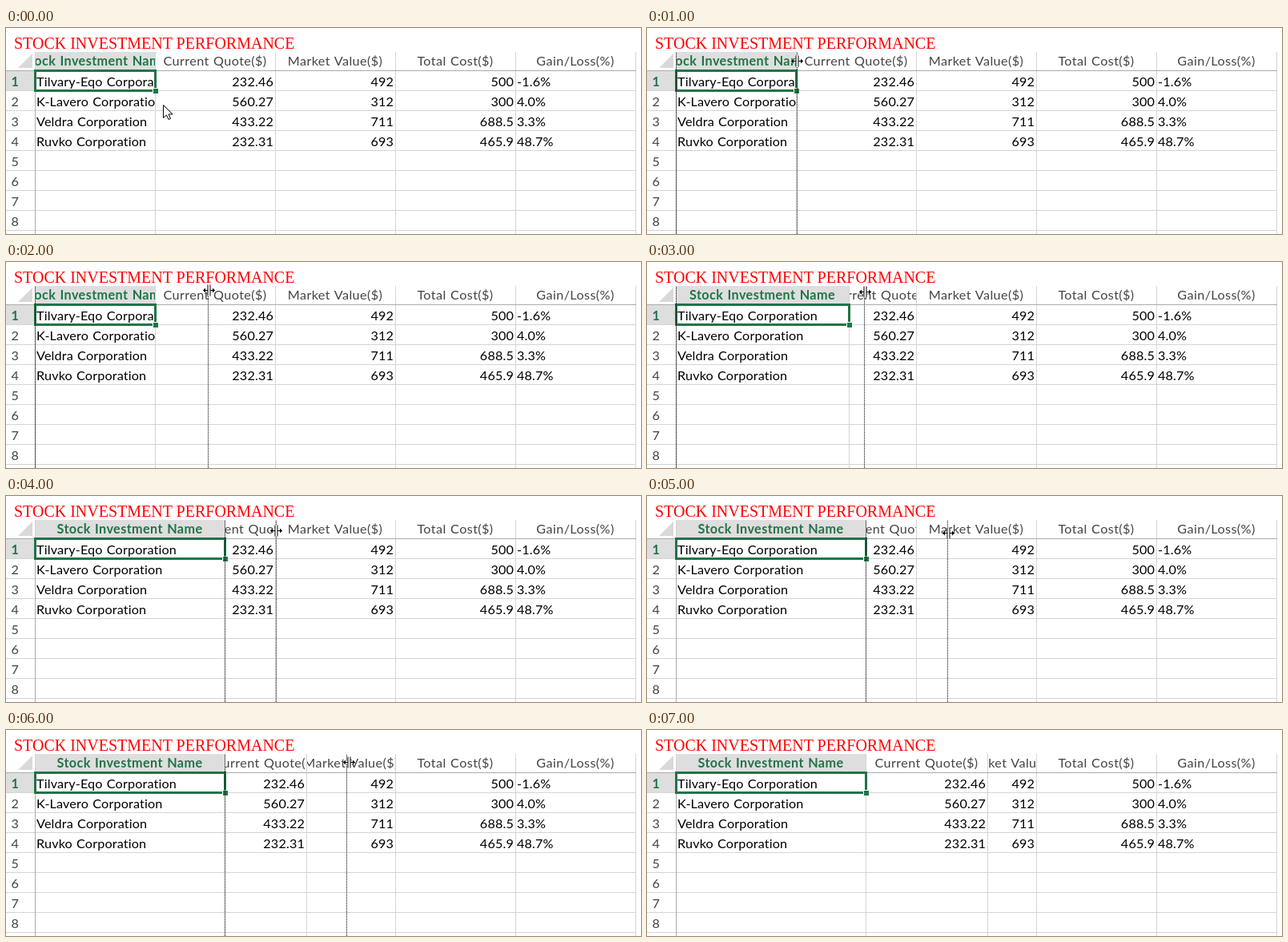
Recreate the animation shown at these times as an HTML page. Size 793 by 258 pixels, loop 8000 ms.

```html
<!DOCTYPE html>
<html lang="en">
<head>
<meta charset="utf-8">
<title>Stock investment performance</title>
<style>
html, body { margin: 0; width: 100%; height: 100%; overflow: hidden; background: #fff; }
svg { display: block; }
text { font: 16.2px Lato, Carlito, sans-serif; letter-spacing: .15px; word-spacing: .9px; white-space: pre; }
.title { font: 20px "Liberation Serif", "Times New Roman", serif; letter-spacing: 0; word-spacing: 0; fill: #f00; }
.head { fill: #444; letter-spacing: .4px; }
.picked { fill: #217346; font-weight: 700; letter-spacing: .4px; }
</style>
</head>
<body>
<svg id="stage" width="793" height="258" viewBox="0 0 793 258"></svg>
<script>
const stage = document.getElementById('stage');
const GREEN = '#217346', GRID = '#d4d4d4', EDGE = '#ababab', SHADE = '#dedede';
const LEFT = 36, TOP = 53, ROW = 25, LOOP = 8000;

const heads = ['Stock Investment Name', 'Current Quote($)', 'Market Value($)', 'Total Cost($)', 'Gain/Loss(%)'];
const rows = [
  ['Tilvary-Eqo Corporation', '232.46', '492', '500', '-1.6%'],
  ['K-Lavero Corporation', '560.27', '312', '300', '4.0%'],
  ['Veldra Corporation', '433.22', '711', '688.5', '3.3%'],
  ['Ruvko Corporation', '232.31', '693', '465.9', '48.7%']
];

// a, b: right edges of the first two columns; drag: guide lines; grip, arrow: pointer position
const steps = [
  { at: 0, a: 186, b: 336, arrow: [196, 96] },
  { at: 1000, a: 186, b: 336, drag: [36, 187], grip: [187, 41] },
  { at: 2000, a: 186, b: 336, drag: [36, 252], grip: [253, 35] },
  { at: 3000, a: 252, b: 336, drag: [36, 271], grip: [272, 37] },
  { at: 4000, a: 273, b: 336, drag: [273, 337], grip: [337, 43] },
  { at: 5000, a: 273, b: 336, drag: [273, 375], grip: [376, 46] },
  { at: 6000, a: 273, b: 375, drag: [273, 425], grip: [428, 40] },
  { at: 7000, a: 273, b: 425 }
];

const rect = (x, y, w, h, fill) =>
  `<rect x="${x}" y="${y}" width="${w}" height="${h}" fill="${fill}"/>`;

const label = (x, y, s, cls = '', anchor = 'start') =>
  `<text x="${x}" y="${y}" class="${cls}" text-anchor="${anchor}">${s}</text>`;

const clip = (x, y, w, h, inner) =>
  `<svg x="${x}" y="${y}" width="${w}" height="${h}" viewBox="${x} ${y} ${w} ${h}">${inner}</svg>`;

const guide = x =>
  `<path d="M${x + .5} 31V258" stroke="#000" stroke-dasharray="1 1" shape-rendering="crispEdges"/>`;

const grip = ([x, y]) => `<g transform="translate(${x + .5} ${y + .5})" fill="none">
  <path d="M0 -7V7M-7 0H7" stroke="#fff" stroke-width="4"/>
  <path d="M-1.5 -7V7M1.5 -7V7M-7 0H-1.5M1.5 0H7" stroke="#000"/>
  <path d="M-7.5 0l3 -3v6zM7.5 0l-3 -3v6z" fill="#000"/></g>`;

const arrow = ([x, y]) =>
  `<path transform="translate(${x + .5} ${y + .5})" d="M0 0V16L4 12.5L6.5 18L9 17L6.5 11.5H11.5Z" fill="#fff" stroke="#000"/>`;

function sheet({ a, b }) {
  const edges = [LEFT, a, b, 486, 636, 786];
  let out = rect(LEFT + 1, 30, a - LEFT - 1, 23, SHADE) + rect(0, TOP + 1, 35, 24, SHADE);
  out += '<path d="M33 32V50H15Z" fill="#d9d9d9"/>';

  for (const x of edges) out += rect(x, 30, 1, 228, GRID);
  for (let i = 1; i <= 8; i++) out += rect(0, TOP + i * ROW, 787, 1, GRID);
  out += rect(0, TOP, 787, 1, EDGE) + rect(LEFT, TOP, 1, 205, EDGE);

  for (let i = 0; i < 8; i++)
    out += label(11.5, 73 + i * ROW, i + 1, i ? 'head' : 'picked', 'middle');

  heads.forEach((head, c) => {
    const x = edges[c], w = edges[c + 1] - x;
    out += clip(x + 1, 30, w - 1, 23, label(x + w / 2, 47, head, c ? 'head' : 'picked', 'middle'));
    const right = c > 0 && c < 4;
    const cells = rows.map((row, r) =>
      label(right ? x + w - 2 : x + 2, 73 + r * ROW, row[c], '', right ? 'end' : 'start')).join('');
    out += clip(x + 1, TOP + 1, w, 204, cells);
  });

  out += `<rect x="36.5" y="53.5" width="${a - LEFT}" height="25" fill="none" stroke="${GREEN}" stroke-width="3"/>`;
  return out + rect(a - 3, 75, 7, 7, '#fff') + rect(a - 2, 76, 6, 6, GREEN);
}

function draw(step) {
  stage.innerHTML = rect(0, 0, 793, 258, '#fff') + sheet(step) +
    label(10, 26, 'STOCK INVESTMENT PERFORMANCE', 'title') +
    (step.drag || []).map(guide).join('') +
    (step.grip ? grip(step.grip) : '') +
    (step.arrow ? arrow(step.arrow) : '');
}

let shown;
const start = performance.now();
function tick(now) {
  const t = Math.max(0, now - start) % LOOP;
  const step = steps.findLast(s => s.at <= t);
  if (step !== shown) draw(shown = step);
  requestAnimationFrame(tick);
}
tick(start);
</script>
</body>
</html>
```
